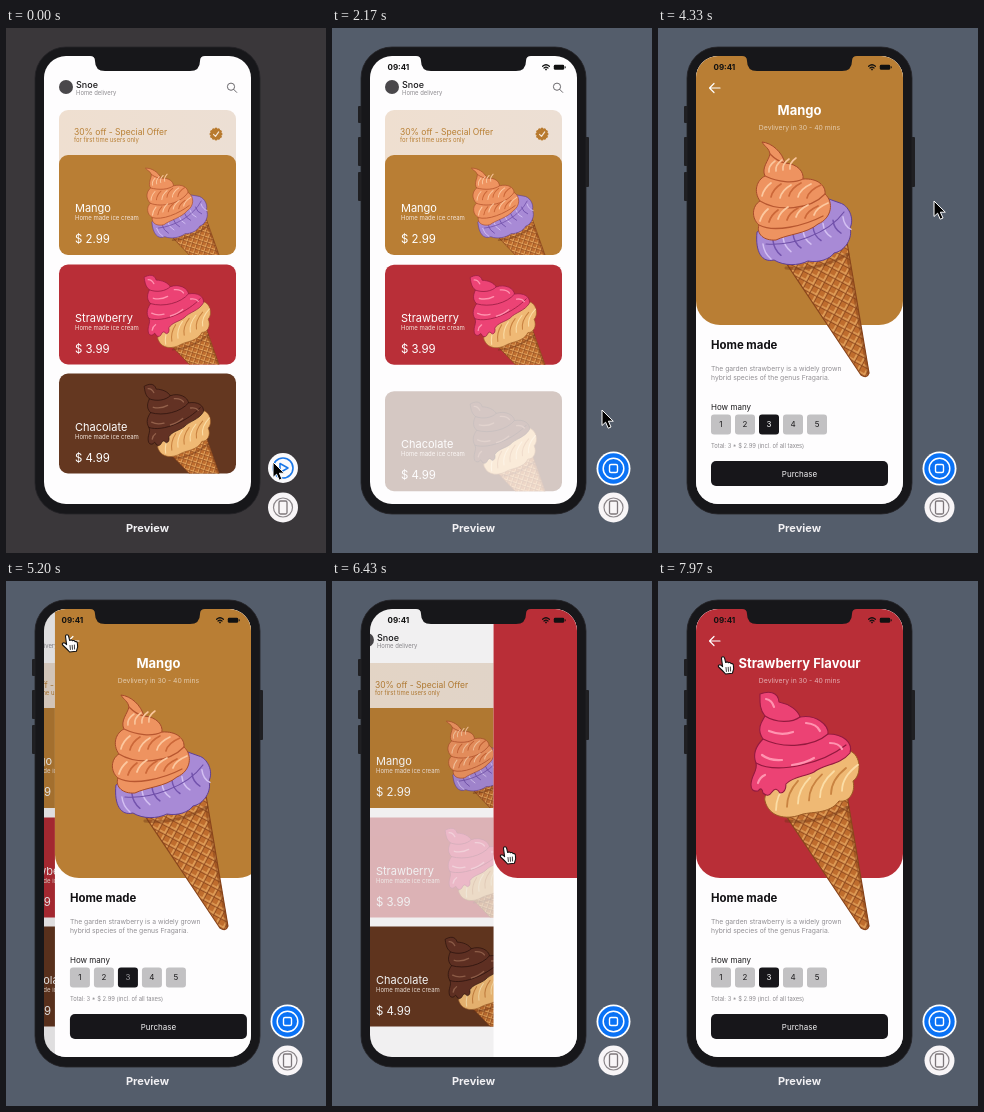
Animation of 320x525 px, one loop 8000 ms. Source, as an HTML page:

```html
<!DOCTYPE html>
<html lang="en">
<head>
<meta charset="utf-8">
<title>Ice cream app preview</title>
<style>
html, body { margin: 0; width: 100%; height: 100%; overflow: hidden; background: #3a373a; }
svg { display: block; width: 100vw; height: 100vh; font-family: Inter, sans-serif; }
.line { fill: none; stroke-linecap: round; stroke-linejoin: round; }
</style>
</head>
<body>
<svg id="stage" viewBox="0 0 320 525"></svg>
<script>
const LOOP = 8000;
const LIVE = 900;
const PUSH_MANGO = 3213, POP_MANGO = 5195, PUSH_BERRY = 6374;
const WIDTH = 207, PARALLAX = 0.3, RISE = 24;

const range = n => [...Array(n).keys()];
const text = (x, y, size, fill, str, extra = '') =>
  `<text x="${x}" y="${y}" font-size="${size}" fill="${fill}" ${extra}>${str}</text>`;
const line = (d, stroke, width = 1, extra = '') =>
  `<path class="line" d="${d}" stroke="${stroke}" stroke-width="${width}" ${extra}/>`;
const shape = (d, fill, stroke, width = 1) =>
  `<path d="${d}" fill="${fill}" stroke="${stroke}" stroke-width="${width}" stroke-linejoin="round"/>`;
const rect = (x, y, w, h, r, fill, extra = '') =>
  `<rect x="${x}" y="${y}" width="${w}" height="${h}" rx="${r}" fill="${fill}" ${extra}/>`;
const circle = (x, y, r, fill, extra = '') =>
  `<circle cx="${x}" cy="${y}" r="${r}" fill="${fill}" ${extra}/>`;
const BOLD = 'font-weight="700"', MID = 'text-anchor="middle"';

// Ice cream artwork
const wafer = shape('M122 226L189 214L211 345Q209 351 203 347Z', 'url(#wafer)', '#8a461c', 1.2)
  + line('M189 226L210 345', '#7c3d18', 2.5, 'opacity=".45"')
  + line('M128 240Q160 244 190 226', '#6d3415', 3, 'opacity=".4"');

const softServe = wafer
  + shape('M99 204C97 224 104 235 116 232C126 238 140 238 150 233C161 235 172 231 176 225C187 223 195 210 192 200C197 190 190 177 182 175L168 170L120 190Z', '#a88ad6', '#5f4096')
  + range(9).map(i => line(`M${105 + i * 10} ${216 - i * 3.4}q1 9 8 ${15 - i * 0.3}`, i % 2 ? '#7454ae' : '#d3bff2', 1.5)).join('')
  + line('M108 216C134 218 170 206 186 184', '#6f4fa8', 1.2)
  + shape('M104 114C114 115 124 124 127 135C140 136 146 144 145 151C160 150 168 158 167 166C176 174 174 190 160 196C148 206 130 206 118 212C106 213 98 206 101 197C93 190 94 178 102 173C95 163 99 152 107 148C103 140 111 132 112 126C111 120 107 119 104 114Z', '#ee9360', '#a64b2a')
  + line('M112 126C118 132 122 134 127 135M107 148C120 154 135 156 145 151M102 173C120 184 152 182 167 166M101 197C116 205 146 198 165 188', '#b85730', 1.3)
  + range(4).map(i => line(`M${111 + i * 7} ${144 - i}q-1 -6 6 -11`, '#fac69c', 1.6)).join('')
  + range(6).map(i => line(`M${104 + i * 9} ${168 + (i % 3)}q2 -8 ${9 + i} -13`, i % 2 ? '#cc6839' : '#fcc89f', 1.7)).join('')
  + range(7).map(i => line(`M${102 + i * 9} ${193 + 2 * (i % 2) - i}q2 -7 ${8 + i} -12`, i % 2 ? '#cc6839' : '#fcc89f', 1.8)).join('');

const scoop = (fill, dark, light) => wafer
  + shape('M107 220C103 204 150 190 192 170C203 174 204 194 195 200C198 212 190 222 181 220C171 234 152 230 142 234C128 239 111 236 107 220Z', '#efb974', '#9a5a24')
  + range(7).map(i => line(`M${118 + i * 11} ${229 - i * 3.2}q0 -14 ${10 + i} -26`, i % 2 ? '#c98341' : '#fbdda6', 1.8)).join('')
  + shape('M102 113C110 110 120 110 121 121C131 123 140 129 142 136C158 133 171 144 170 153C186 153 195 162 192 172C182 184 166 183 156 191C146 196 135 195 128 203Q128 212 122 212Q118 205 114 211Q110 217 105 212Q104 205 100 210Q93 211 93 204C93 194 100 190 98 182C94 172 99 164 105 158C98 148 104 140 107 135C101 128 102 120 102 113Z', fill, dark, 1.1)
  + line('M107 135C118 142 134 142 142 136M105 158C125 168 155 166 170 153M98 182C120 194 165 182 188 164', dark, 1.2)
  + line('M108 118q6 1 8 8M111 150q12 5 24 1M104 174q8 6 20 5M148 142q11 1 14 8M172 162q9 0 12 6M100 202q2 -6 7 -8M134 184q14 -2 22 -7', light, 2.2);

const defs = `<defs>
  <pattern id="wafer" width="8" height="8" patternUnits="userSpaceOnUse" patternTransform="rotate(28)">
    ${rect(0, 0, 8, 8, 0, '#bf6d2e')}
    <path d="M0 1H8M1 0V8" stroke="#e5a45c" stroke-width="1.7"/>
    <path d="M0 2.4H8M2.4 0V8" stroke="#8a451c" stroke-width=".9"/>
  </pattern>
  <linearGradient id="promo"><stop offset="0" stop-color="#efdfd0"/><stop offset="1" stop-color="#ecdfd4"/></linearGradient>
  <clipPath id="screen">${rect(38, 28, WIDTH, 448, 22, '#000')}</clipPath>
  <clipPath id="card">${rect(53, 0, 177, 100, 9, '#000')}</clipPath>
  <g id="mango">${softServe}</g>
  <g id="berry">${scoop('#ec4274', '#941a3f', '#ff94b0')}</g>
  <g id="choco">${scoop('#633224', '#2d130d', '#93604a')}</g>
</defs>`;

// Home page
const card = (art, y, fill, name, price) => `<g class="item" data-y="${y}">
  ${rect(53, 0, 177, 100, 9, fill)}
  <g clip-path="url(#card)"><use href="#${art}" transform="translate(170 45) rotate(-10) scale(.6) translate(-145 -175)"/></g>
  ${text(69, 57, 11, '#fff', name)}
  ${text(69, 65, 6, '#f3e6dc', 'Home made ice cream')}
  ${text(69, 88, 11.4, '#fff', '$ ' + price)}</g>`;

const teeth = range(12).map(i => circle(210 + 5 * Math.cos(i * Math.PI / 6), 24 + 5 * Math.sin(i * Math.PI / 6), 1.5, '#b87a2e')).join('');
const promo = `<g class="item" data-y="82">
  ${rect(53, 0, 177, 100, 9, 'url(#promo)')}
  ${text(68, 24.5, 8.5, '#b87f33', '30% off - Special Offer')}
  ${text(68, 32, 5.95, '#b87f33', 'for first time users only')}
  ${teeth}${circle(210, 24, 5.2, '#b87a2e')}${line('M207.5 24.3l2 2l3.2-4.4', '#f3e4d4', 1.2)}</g>`;

const home = `<g id="home">
  ${rect(38, 28, 300, 448, 0, '#fefdfe')}
  ${circle(60, 59, 7, '#4a484b')}
  ${text(70, 59.5, 9, '#1c1b1d', 'Snoe', 'font-weight="500"')}
  ${text(70, 67, 5.9, '#8d8b8f', 'Home delivery')}
  ${circle(225, 58.7, 3.6, 'none', 'stroke="#6b696d"')}${line('M227.7 61.4l3 3', '#6b696d')}
  ${promo}
  ${card('mango', 127, '#b97e34', 'Mango', '2.99')}
  ${card('berry', 236.5, '#b92e37', 'Strawberry', '3.99')}
  ${card('choco', 345.5, '#643720', 'Chacolate', '4.99')}
  <rect id="dim" x="38" y="28" width="300" height="448"/></g>`;

// Detail page
const step = i => {
  const on = i === 2, x = 53 + 24 * i;
  return rect(x, 386.5, 20, 20, 3, on ? '#17161a' : '#c2c1c3')
    + text(x + 10, 399.4, 8, on ? '#fff' : '#1c1b1d', i + 1, MID + (on ? ' class="count"' : ''));
};
const part = body => `<g class="part">${body}</g>`;
const detail = (id, art, fill, name) => `<g id="${id}">
  ${rect(38, 28, WIDTH, 448, 0, '#fefdfe')}
  <path d="M38 28H245V273a24 24 0 0 1-24 24H62a24 24 0 0 1-24-24Z" fill="${fill}"/>
  ${part(line('M62 60H51.5M56 55.5L51.5 60L56 64.5', '#fff', 1.2)
    + text(141.5, 86.6, 13, '#fff', name, `${BOLD} ${MID}`)
    + text(141.5, 101.7, 6.85, '#fff', 'Devlivery in 30 - 40 mins', `${MID} opacity=".6"`))}
  ${part(`<use href="#${art}"/>`)}
  ${part(text(53, 321, 11.4, '#111013', 'Home made', BOLD)
    + text(53, 343.3, 6.75, '#918f93', 'The garden strawberry is a widely grown')
    + text(53, 351.5, 6.75, '#918f93', 'hybrid species of the genus Fragaria.'))}
  ${part(text(53, 382, 8, '#1c1b1d', 'How many') + range(5).map(step).join(''))}
  ${part(text(53, 419.6, 5.8, '#8a888c', 'Total: 3 * $ 2.99 (incl. of all taxes)'))}
  ${part(rect(53, 433, 177, 25, 5, '#17161a') + text(141.5, 448.5, 8, '#f4f3f5', 'Purchase', MID))}</g>`;

// Device and preview controls
const keys = [[26, 78, 17], [26, 109, 29], [26, 144, 29], [252, 109, 50]]
  .map(([x, y, h]) => rect(x, y, 5, h, 1, '#1f1f22')).join('');
const status = text(55.5, 42.3, 8, '#111', '09:41', BOLD)
  + line('M210.6 38.3Q214 35.2 217.4 38.3M212 40Q214 38.2 216 40', '#111', 1.2) + circle(214, 41.4, 0.9, '#111')
  + rect(221.8, 36.8, 10.4, 5, 1.4, '#111') + rect(232.7, 38.3, 1, 2, 0.5, '#111');
const notch = `<path d="M84 27V28Q89 28 89 33Q89 43 99 43H184Q194 43 194 33Q194 28 199 28V27Z" fill="#17171a"/>`;

const playButton = circle(277, 440, 15, '#fbfafc')
  + circle(277, 440, 10, 'none', 'stroke="#1a77e8" stroke-width="1.6"')
  + line('M274 435.5L282 440L274 444.5Z', '#1a77e8', 1.5);
const stopButton = circle(281.5, 440.5, 17, '#fff') + circle(281.5, 440.5, 15.2, '#0a72f5')
  + circle(281.5, 440.5, 10.3, 'none', 'stroke="#fff" stroke-width="1.5"')
  + rect(277.5, 436.5, 8, 8, 1.5, 'none', 'stroke="#fff" stroke-width="1.4"');
const deviceButton = `<g id="device">${circle(277, 479.5, 15, '#f8f5f7')}
  ${circle(277, 479.5, 9.5, 'none', 'stroke="#8b868a" stroke-width="1.2"')}
  ${rect(273, 473, 8, 13, 1.5, '#f8f5f7', 'stroke="#7d777b" stroke-width="1.3"')}</g>`;

const cursor = `<g id="cursor">
  <path id="arrow" d="M0 0V15.5L3.6 12.2L6.2 18.2L9 17L6.4 11.2H11.3Z" fill="#000" stroke="#fff" stroke-linejoin="round"/>
  <g id="hand"><path d="M-1.5 1.5Q-1.5-.4.2-.2Q1.5 0 1.8 1.8L2.6 5.5Q4.5 4.2 5.4 5.8Q7.2 4.9 8 6.6Q10 6 10.4 8.2Q11.4 12 9.4 16.2L2.6 17Q-1 13-4.4 10Q-5.4 8.2-3.4 7.8Q-1.8 8-.4 9.6Z" fill="#fff" stroke="#111" stroke-width="1.1" stroke-linejoin="round"/>
  ${line('M3 10.5l.4 4M5.2 10.3l.3 4M7.4 10l.1 4', '#111', 0.8)}</g></g>`;

const stage = document.getElementById('stage');
stage.innerHTML = defs + rect(0, 0, 320, 525, 0, '#3a373a') + rect(0, 0, 320, 525, 0, '#545d6b', 'id="tint"')
  + `<g id="keys">${keys}</g>`
  + rect(29, 19, 225, 467, 31, '#17171a', 'stroke="#252427" stroke-width=".8"')
  + `<g clip-path="url(#screen)">${home}
    ${detail('mangoPage', 'mango', '#b97e34', 'Mango')}
    ${detail('berryPage', 'berry', '#b92e37', 'Strawberry Flavour')}</g>`
  + notch + `<g id="status">${status}</g>`
  + text(141.5, 504, 11, '#f1f0f3', 'Preview', `${BOLD} ${MID}`)
  + `<g id="play">${playButton}</g><g id="stop">${stopButton}</g>` + deviceButton + cursor;

const $ = id => document.getElementById(id);
const items = [...document.querySelectorAll('.item')];
const parts = id => [...$(id).querySelectorAll('.part')];
const pages = [
  { node: $('mangoPage'), parts: parts('mangoPage'), push: PUSH_MANGO, pop: POP_MANGO },
  { node: $('berryPage'), parts: parts('berryPage'), push: PUSH_BERRY, pop: Infinity }
];
const count = $('mangoPage').querySelector('.count');

// Cursor tip: time, x, y
const path = [
  [0, 267, 434], [900, 267, 434], [1500, 270, 382], [2250, 270, 382], [2900, 192, 200],
  [3300, 192, 200], [3900, 276, 173], [4380, 276, 173], [5000, 61, 54], [5350, 61, 54],
  [6100, 173, 266], [6500, 173, 266], [7050, 268, 190], [7300, 268, 190], [7900, 65, 76], [LOOP, 65, 76]
];

const clamp = v => Math.max(0, Math.min(1, v));
const ease = v => { v = clamp(v); return v < 0.5 ? 2 * v * v : 1 - 2 * (1 - v) ** 2; };
const slide = ms => {
  const s = Math.max(0, Math.min(0.6, ms / 1000));
  return (1 - Math.exp(-9 * s)) / (1 - Math.exp(-5.4));
};
const show = (node, on) => node.setAttribute('display', on ? 'inline' : 'none');
const move = (node, x, y) => node.setAttribute('transform', `translate(${x} ${y})`);

function pointer(t) {
  const i = Math.max(1, path.findIndex(k => k[0] > t));
  const [a, x0, y0] = path[i - 1], [b, x1, y1] = path[i];
  const p = ease((t - a) / (b - a));
  return [x0 + (x1 - x0) * p, y0 + (y1 - y0) * p];
}

function pressed(t) {
  if (t < 6290) return 1;
  return 1 - 0.8 * clamp((t - 6290) / 40) * (1 - ease((t - 6340) / 350));
}

function draw(t) {
  const live = t >= LIVE;
  $('tint').setAttribute('opacity', ease((t - 20) / 600));
  ['keys', 'status', 'stop'].forEach(id => show($(id), live));
  show($('play'), !live);
  move($('device'), live ? 4.5 : 0, 0);

  items.forEach((node, i) => {
    const p = live ? ease((t - 1342 - 228 * i) / 400) : 1;
    move(node, 0, +node.dataset.y + RISE * (1 - p));
    node.setAttribute('opacity', i === 2 ? p * pressed(t) : p);
  });

  let depth = 0;
  pages.forEach(({ node, parts, push, pop }) => {
    const p = slide(t - push) - slide(t - pop);
    depth += p;
    show(node, p > 0.001);
    move(node, WIDTH * (1 - p), 0);
    parts.forEach((el, i) => {
      const q = ease((t - push - 200 - 100 * i) / 400);
      move(el, 0, RISE * (1 - q));
      el.setAttribute('opacity', q);
    });
  });
  move($('home'), -WIDTH * PARALLAX * depth, 0);
  $('dim').setAttribute('opacity', 0.13 * depth);
  count.setAttribute('fill', t >= POP_MANGO ? '#a3a2a5' : '#fff');

  const [x, y] = pointer(t);
  const inside = x > 38 && x < 245 && y > 28 && y < 476;
  move($('cursor'), x, y);
  show($('hand'), inside);
  show($('arrow'), !inside);
}

const start = performance.now();
function tick() {
  draw((performance.now() - start) % LOOP);
  requestAnimationFrame(tick);
}
draw(0);
requestAnimationFrame(tick);
</script>
</body>
</html>
```
